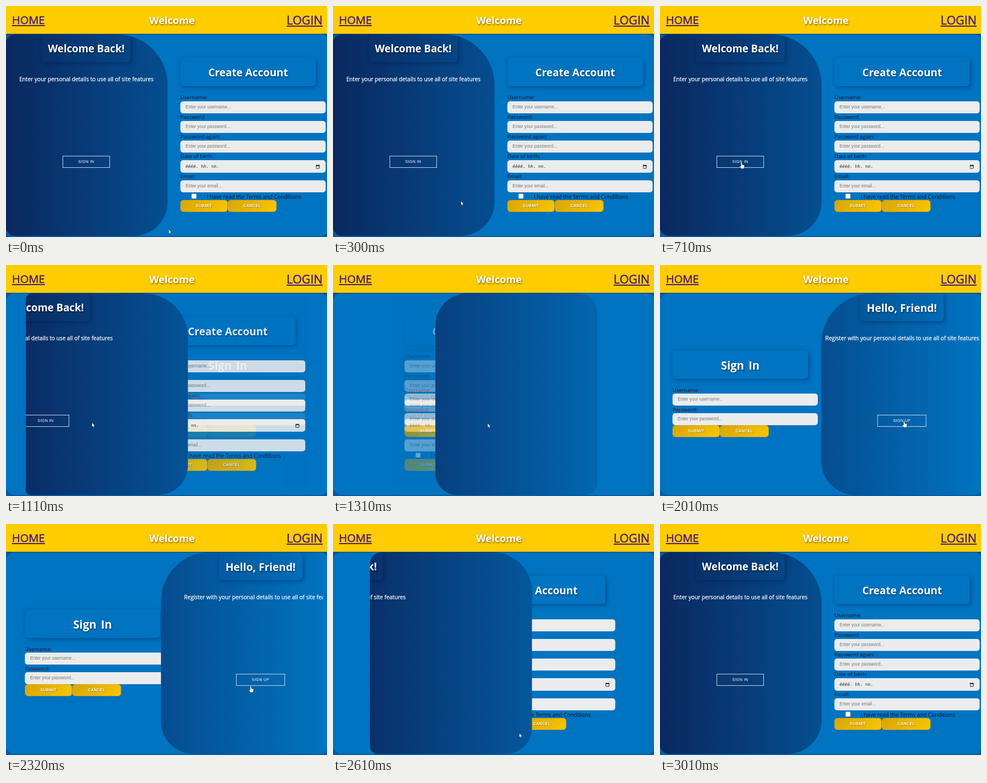
Animation of 590x424 px, one loop 3.51 s. Source, as an HTML page:

```html
<!DOCTYPE html>
<html lang="en">
<head>
<meta charset="utf-8">
<title>Welcome</title>
<style>
  html, body { margin: 0; width: 100%; height: 100%; overflow: hidden; }
  body {
    position: relative; background: #085a9f;
    font: 9.8px/14px "Comic Sans MS", "Open Sans", sans-serif;
    white-space: nowrap; cursor: default;
  }
  header {
    position: absolute; z-index: 2; top: 0; left: 0; width: 590px; height: 51px;
    background: #fc0; box-shadow: 0 1px 2px rgba(0, 20, 60, .35);
    font-size: 20.3px; line-height: 51px;
  }
  header * { position: absolute; top: 0; }
  header a {
    color: #4a1a78; text-decoration: underline 2px; text-underline-offset: 2px;
    -webkit-text-stroke: .5px;
  }
  .home { left: 11px; }
  .login { right: 8px; font-size: 21.8px; }
  header b {
    left: 10px; width: 590px; text-align: center; font-size: 18.4px; color: #fff;
    text-shadow: 1px 2px 3px rgba(0, 0, 0, .45);
  }

  .stage {
    --d: 0px; --w: 297.5px;
    position: absolute; left: -1px; top: 52px; width: 595px; height: 370px;
    overflow: hidden; border-radius: 18px; background: #0074c1;
  }
  .stage * { position: absolute; box-sizing: border-box; }
  .form, .panel { top: 0; left: 0; width: var(--w); height: 370px; }
  .form { background: #0074c1; transform: translateX(calc(var(--w) - var(--d))); color: #0c1626; }
  .panel { overflow: hidden; transform: translateX(var(--d)); color: #fff; }
  .shade {
    left: 0; width: 595px; height: 370px; transform: translateX(calc(0px - var(--d)));
    background: linear-gradient(to right, #0a285f, #0074c1);
  }
  .side { width: var(--w); height: 370px; text-align: center; }
  .back { transform: translateX(calc(-3 * var(--d))); }
  .hello { transform: translateX(calc(3 * (var(--w) - var(--d)))); }

  .title {
    left: 24px; width: 249px; height: 52px; border-radius: 6px; text-align: center;
    font-weight: bold; font-size: 19.2px; line-height: 54px; color: #fff;
    text-shadow: 1px 2px 3px rgba(0, 0, 0, .4);
    box-shadow: 3px 3px 7px rgba(0, 20, 70, .32), -2px -2px 6px rgba(0, 40, 100, .08);
  }
  .side .title { top: -1px; left: 67px; width: 163px; font-size: 18.8px; line-height: 55px; }
  .side.hello .title { left: 71px; width: 154px; font-size: 19.5px; }
  .side p { top: 74.5px; left: -20px; right: -20px; margin: 0; font-size: 10.2px; -webkit-text-stroke: .25px; }

  .label { left: 24px; }
  .in .label { color: #35203c; font-weight: 600; font-size: 9.3px; }
  .input {
    left: 24px; width: 267px; height: 22px; padding-left: 9.5px; border-radius: 5px;
    background: #ebeced; color: #777; font: 8.2px/22px Arial, "Liberation Sans", sans-serif;
  }
  .date { height: 23px; color: #222; font: 7.9px/23px "DejaVu Sans Mono", monospace; }
  .date svg { left: 249px; top: 8px; }
  .check { left: 44px; top: 292px; width: 10px; height: 10px; border-radius: 2px; background: #fff; border: 1px solid #8793a0; }

  .btn {
    height: 22px; border-radius: 6px; text-align: center; color: #fff;
    font: bold 7.3px/20px Arial, "Liberation Sans", sans-serif; letter-spacing: .3px;
    border: 1px dashed #c79a10; background: linear-gradient(135deg, #d8a508, #fac600);
    text-shadow: 1px 1px 1px rgba(90, 60, 0, .5);
  }
  .submit { left: 24px; width: 87px; }
  .cancel { left: 111px; width: 90px; }
  .side .btn {
    top: 223px; left: 105px; width: 87px; font-weight: normal; background: none;
    border: 1px solid #c5d5e6; border-radius: 0; text-shadow: none;
  }
  .side.hello .btn { left: 103px; width: 90px; }
  .pointer { position: absolute; z-index: 3; left: 0; top: 0; overflow: visible; }
</style>
</head>
<body>
<header>
  <a class="home">HOME</a><b>Welcome</b><a class="login">LOGIN</a>
</header>

<main class="stage">
  <section class="form in">
    <div class="title" style="top:105px;font-size:20.5px;word-spacing:3px">Sign In</div>
    <div class="label" style="top:171px">Username:</div>
    <div class="input" style="top:184px">Enter your username...</div>
    <div class="label" style="top:207px">Password:</div>
    <div class="input" style="top:220px">Enter your password...</div>
    <div class="btn submit" style="top:242px">SUBMIT</div>
    <div class="btn cancel" style="top:242px">CANCEL</div>
  </section>

  <section class="form up">
    <div class="title" style="top:43px">Create Account</div>
    <div class="label" style="top:109px">Username:</div>
    <div class="input" style="top:123px">Enter your username...</div>
    <div class="label" style="top:145px">Password:</div>
    <div class="input" style="top:159px">Enter your password...</div>
    <div class="label" style="top:181px">Password again:</div>
    <div class="input" style="top:195px">Enter your password...</div>
    <div class="label" style="top:217px">Date of birth:</div>
    <div class="input date" style="top:231px">éééé. hh. nn.
      <svg width="8" height="8"><path d="M.5 1.5h6v5.5h-6z" fill="none" stroke="#222"/><path d="M0 1h7v2H0zM1 0h1v1H1zM5 0h1v1H5z" fill="#222"/></svg>
    </div>
    <div class="label" style="top:254px">Email:</div>
    <div class="input" style="top:268px">Enter your email...</div>
    <div class="check"></div>
    <div class="label" style="top:291px;left:72.5px;font-size:10px">I have read the Terms and Conditions</div>
    <div class="btn submit" style="top:304px">SUBMIT</div>
    <div class="btn cancel" style="top:304px">CANCEL</div>
  </section>

  <section class="panel">
    <div class="shade"></div>
    <div class="side back">
      <div class="title">Welcome Back!</div>
      <p>Enter your personal details to use all of site features</p>
      <div class="btn">SIGN IN</div>
    </div>
    <div class="side hello">
      <div class="title">Hello, Friend!</div>
      <p>Register with your personal details to use all of site features</p>
      <div class="btn">SIGN UP</div>
    </div>
  </section>
</main>

<svg class="pointer" width="10" height="12">
  <path class="arrow" d="M0 0V7.6L1.8 6 3 8.8 4.3 8.2 3.1 5.6H5.4Z" fill="#fff" stroke="#222" stroke-width=".5"/>
  <path class="hand" d="M-1.2-.8Q0-1.8.9-.8V2.8L4.2 3.5Q5.3 4 5 5.4L4.4 10H-.8L-3.4 6Q-2.9 4.8-1.2 6Z" fill="#fff" stroke="#222" stroke-width=".4"/>
</svg>

<script>
  const LOOP = 3510, WIDTH = 297.5;
  const RADIUS = { top: 93, bottom: 62 };
  const OUT = { start: 962, length: 600 };
  const BACK = { start: 2243, length: 550 };

  const TICKS = [0, 100, 200, 300, 400, 500, 600, 710, 1010, 1110, 1210, 1310, 1410, 1510,
    1610, 1710, 2010, 2320, 2410, 2510, 2610, 2710, 2810, 2910, 3010];

  // Pointer stops: time, x, y
  const PATH = [[0, 299, 410], [300, 235, 358], [600, 152, 291], [710, 150, 288.5], [1010, 151, 289],
    [1110, 158, 289.5], [1510, 410.5, 292], [1710, 446, 286], [2010, 449, 288], [2320, 450, 299],
    [2610, 342.5, 384], [2810, 300, 428], [3510, 300, 440]];

  const $ = s => document.querySelector(s);
  const stage = $('.stage'), up = $('.up'), panel = $('.panel');
  const pointer = $('.pointer'), arrow = $('.arrow'), hand = $('.hand');

  const progress = (t, { start, length }) => Math.min(1, Math.max(0, (t - start) / length));

  // cubic-bezier(.42, 0, .58, 1)
  function easeInOut(x) {
    let lo = 0, hi = 1;
    for (let i = 0; i < 24; i++) {
      const s = (lo + hi) / 2, r = 1 - s;
      if (1.26 * s * r * r + 1.74 * s * s * r + s ** 3 < x) lo = s; else hi = s;
    }
    return lo * lo * (3 - 2 * lo);
  }

  function pointerAt(t) {
    const i = Math.max(1, PATH.findIndex(p => p[0] >= t));
    const [t0, x0, y0] = PATH[i - 1], [t1, x1, y1] = PATH[i];
    const k = (t - t0) / (t1 - t0);
    return [x0 + (x1 - x0) * k, y0 + (y1 - y0) * k];
  }

  function draw(t) {
    const back = progress(t, BACK);
    const out = easeInOut(progress(t, OUT));
    const k = back > 0 ? 1 - easeInOut(back) : out;
    const { top, bottom } = RADIUS;

    stage.style.setProperty('--d', k * WIDTH + 'px');
    panel.style.borderRadius =
      [top * k, top * (1 - k), bottom * (1 - k), bottom * k].map(r => r + 'px').join(' ');

    // Fades on the way out, pops in halfway back.
    up.style.opacity = back > 0 ? +(back >= .5) : out > .875 ? 0 : 1 - out;

    const [x, y] = pointerAt(t);
    const over = (t >= 600 && t < 1110) || (t >= 1610 && t < 2410);
    pointer.style.transform = `translate(${x}px, ${y}px)`;
    hand.style.display = over ? '' : 'none';
    arrow.style.display = over ? 'none' : '';
  }

  const began = performance.now();
  function loop() {
    const t = (performance.now() - began) % LOOP;
    draw(TICKS.findLast(tick => tick <= t) ?? 0);
    requestAnimationFrame(loop);
  }
  loop();
</script>
</body>
</html>
```
